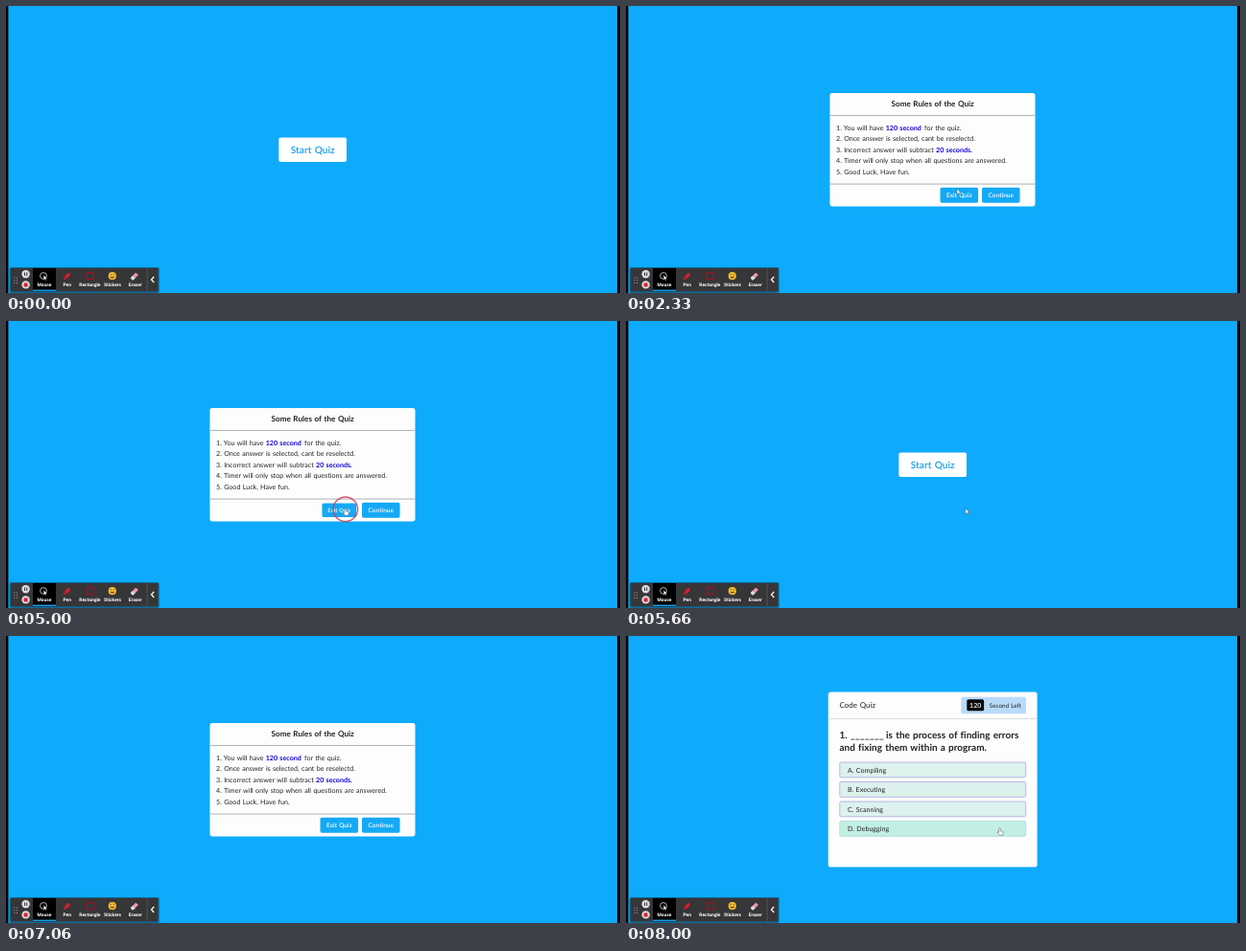
Write an HTML page that moves like this. It is 640x300 px and loops after 8.46 s.

```html
<!DOCTYPE html>
<html lang="en">
<head>
<meta charset="utf-8">
<title>Code Quiz</title>
<style>
  html, body { margin: 0; width: 100%; height: 100%; overflow: hidden; background: #0eaafb; }
  svg { display: block; width: 640px; height: 300px; }
  text { font-family: Lato, "Open Sans", sans-serif; fill: #222; text-rendering: geometricPrecision;
         letter-spacing: .003em; word-spacing: .067em; white-space: pre; }
  .mid { text-anchor: middle; }
  .bold { font-weight: 700; }
  .semi { font-weight: 600; }
  .row { font-size: 7.1px; }
  .blue { font-weight: 700; fill: #1200dc; }
  .btn { font-size: 6.5px; fill: #fff; }
  .ask { font-size: 10px; font-weight: 700; }
  .tool text { font: 700 4.9px Roboto, Arial, sans-serif; fill: #fff; letter-spacing: 0; }
  .zoom { transform-box: fill-box; transform-origin: center; }
</style>
</head>
<body>
<svg viewBox="0 0 640 300">
  <rect width="640" height="300" fill="#0eaafb"/>
  <rect width="2.4" height="300"/>
  <rect x="637" width="3" height="300"/>

  <g id="start" class="zoom">
    <rect x="284.3" y="137.5" width="70.7" height="25.5" rx="2" fill="#fdfefe"/>
    <text class="mid semi" x="319.7" y="153.5" font-size="10.1" style="fill:#159fe8">Start Quiz</text>
  </g>

  <g id="info" class="zoom">
    <rect x="212.5" y="91" width="214" height="118.5" rx="2.4" fill="#fdfdfd"/>
    <path d="M212.5 114.4h214M212.5 186.1h214" stroke="#a5a8ab" stroke-width=".9"/>
    <text class="mid bold" x="319.7" y="105" font-size="8.1">Some Rules of the Quiz</text>
    <g id="rules"></g>
    <g id="exit" class="zoom">
      <rect x="327.5" y="189.7" width="39.6" height="16.1" rx="1.8" fill="#14a9f5"/>
      <text class="btn mid semi" x="347.3" y="199.9">Exit Quiz</text>
    </g>
    <g id="next" class="zoom">
      <rect x="371" y="189.7" width="39.6" height="16.1" rx="1.8" fill="#14a9f5"/>
      <text class="btn mid semi" x="390.8" y="199.9">Continue</text>
    </g>
  </g>

  <g id="quiz" class="zoom">
    <rect x="210.8" y="58.5" width="217.8" height="183" rx="2.6" fill="#fdfdfd"/>
    <path d="M210.8 86.5h217.8" stroke="#d3d6d8" stroke-width=".8"/>
    <text x="222.5" y="75.4" font-size="8">Code Quiz</text>
    <rect x="349.3" y="63.8" width="67.7" height="17.4" rx="1.6" fill="#b8dbfa"/>
    <rect x="355.3" y="66.3" width="17.8" height="12" rx="1.6" fill="#080808"/>
    <text class="mid semi" x="364.2" y="74.9" font-size="7" style="fill:#fff">120</text>
    <text x="378.8" y="74.7" font-size="6.3">Second Left</text>
    <text class="ask" x="222.5" y="106.7">1.</text>
    <text class="ask" x="234" y="106.7" style="letter-spacing:.035em">_______</text>
    <text class="ask" x="271" y="106.7">is the process of finding errors</text>
    <text class="ask" x="222.5" y="120.3">and fixing them within a program.</text>
    <g id="options"></g>
  </g>

  <g class="tool">
    <rect x="3.6" y="273" width="156.2" height="27" rx="2" fill="#0d4560" opacity=".6"/>
    <rect x="4.8" y="274" width="153.8" height="24.4" rx="1" fill="#363638"/>
    <rect x="28" y="274" width="24" height="24.4" fill="#000"/>
    <rect x="28" y="296.6" width="24" height="1.6" fill="#1b9be8"/>
    <path d="M147.2 274v24.4" stroke="#666" stroke-width=".6"/>
    <path d="M8.9 283.6v7M11.5 283.6v7" stroke="#aaa" stroke-dasharray="1 1.7"/>
    <circle cx="20.6" cy="280.2" r="4.2" fill="#dcdce2"/>
    <path d="M19.5 278.4v3.6M21.7 278.4v3.6" stroke="#444" stroke-width="1.1"/>
    <circle cx="20.6" cy="291.4" r="4.2" fill="#dcdce2"/>
    <rect x="18.6" y="289.4" width="4" height="4" rx=".4" fill="#d8232f"/>
    <circle cx="39" cy="282" r="3.4" fill="none" stroke="#ddd" stroke-width=".8"/>
    <path d="M39.2 281.2v5.4l1.3-1.1.8 1.6.9-.5-.8-1.5h1.7z" fill="#fff" stroke="#000" stroke-width=".4"/>
    <path d="M60 286l.8-3 4.2-4.2 2.2 2.2-4.2 4.2z" fill="#d81f33"/>
    <path d="M60.8 283l2.2 2.2" stroke="#7d0d1b" stroke-width=".7"/>
    <rect x="84.4" y="278.7" width="7.2" height="6.8" fill="none" stroke="#b00d20" stroke-width="1.1"/>
    <circle cx="110.8" cy="282.2" r="4.1" fill="#f0bb35"/>
    <path d="M108.4 283q2.4 3 4.8 0z" fill="#74401b"/>
    <path d="M109.3 280.2v1.2M112.3 280.2v1.2" stroke="#74401b" stroke-width=".9"/>
    <path d="M130 284l5.2-5.2 2.8 2.2-5.2 5.2h-1.6z" fill="#ee9aa9"/>
    <path d="M130 284l1.8-1.8 2.8 2.2-1.8 1.8h-1.6z" fill="#d9dfea"/>
    <path d="M154.3 283l-2.8 3 2.8 3" fill="none" stroke="#fff" stroke-width="1.2"/>
    <g id="labels"></g>
  </g>

  <circle id="ring" r="12.8" fill="none" stroke="#cf3a55" stroke-width="1.4" opacity=".85"/>
  <g id="cursor" fill="#fff" stroke="#4a4f55" stroke-width=".5" stroke-linejoin="round">
    <path id="arrow" d="M0 0V6l1.4-1.2.9 2 .9-.4-.9-1.9h1.9z"/>
    <path id="hand" d="M-.8.8a.8.8 0 0 1 1.6 0V3l2 .5q.8.3.7 1.2L3 7.4H-.4l-2-2.6q-.3-1 .6-.8l1 .7z"/>
  </g>
</svg>
<script>
  const $ = id => document.getElementById(id);
  const LOOP = 8460, FPS = 15;

  // A starred part of a rule is bold blue and starts at the given x.
  const rules = ['1. You will have', '2. Once answer is selected, cant be reselectd.',
    '3. Incorrect answer will subtract', '4. Timer will only stop when all questions are answered.',
    '5. Good Luck, Have fun.'];
  const ruleText = (x, row, s, tone = '') =>
    `<text class="row ${tone}" x="${x}" y="${129.7 + row * 11.52}">${s}</text>`;
  $('rules').innerHTML = rules.map((s, i) => ruleText(219, i, s)).join('') +
    ruleText(270.7, 0, '120 second', 'blue') + ruleText(311, 0, 'for the quiz.') +
    ruleText(323, 2, '20 seconds.', 'blue');

  $('options').innerHTML = ['A. Compiling', 'B. Executing', 'C. Scanning', 'D. Debugging'].map((s, i) => {
    const y = 132 + i * 20.5, [fill, edge] = i === 3 ? ['#c2efe4', '#a9d8d3'] : ['#ddf1ed', '#a9a9dc'];
    return `<rect x="222.8" y="${y}" width="193.9" height="15.8" rx="1.4" fill="${fill}" stroke="${edge}" stroke-width=".8"/>
      <text class="row" x="231" y="${y + 10.5}">${s}</text>`;
  }).join('');

  $('labels').innerHTML = ['Mouse', 'Pen', 'Rectangle', 'Stickers', 'Eraser'].map((s, i) =>
    `<text class="mid" x="${40 + i * 23.7}" y="293">${s}</text>`).join('');

  // Pointer moves, in ticks of 1/15 s; each starts where the last one ended.
  const home = { x: 302, y: 192 };
  const moves = [
    { from: 1, to: 6, x: 335, y: 155 },
    { from: 11, to: 14, x: 338, y: 155 },
    { from: 32, to: 38, x: 346, y: 196 },
    { from: 47, to: 57, x: 376.8, y: 195 },
    { from: 63, to: 69, x: 353.8, y: 195.8 },
    { from: 85, to: 90, x: 338, y: 154.8 },
    { from: 103, to: 111, x: 389.5, y: 200.8 }
  ];
  const clicks = [23, 75, 97, 117];

  // Where each button is shown and which screen it opens.
  const buttons = {
    start: { on: 'start', opens: 'info' },
    exit: { on: 'info', opens: 'start' },
    next: { on: 'info', opens: 'quiz' }
  };
  for (const id in buttons) buttons[id].box = $(id).querySelector('rect').getBBox();

  const clamp = v => Math.min(1, Math.max(0, v));
  const easeOut = (u, power) => 1 - (1 - u) ** power;
  const show = (id, on) => { $(id).style.display = on ? '' : 'none'; };

  function pointer(k) {
    return moves.reduce((p, m) => {
      const f = easeOut(clamp((k - m.from) / (m.to - m.from)), 3);
      return { x: p.x + (m.x - p.x) * f, y: p.y + (m.y - p.y) * f };
    }, home);
  }

  function buttonAt(p, screen) {
    return Object.keys(buttons).find(id => {
      const { on, box } = buttons[id];
      return on === screen && p.x >= box.x && p.x <= box.x + box.width &&
        p.y >= box.y && p.y <= box.y + box.height;
    });
  }

  // Replays the session up to tick k; levels approach 0 or 1 at a steady rate.
  function stateAt(k) {
    const level = { start: 0, exit: 0, next: 0, info: 0, quiz: 0 };
    let screen = 'start', over;
    for (let i = 0; i <= k; i++) {
      for (const id in level) level[id] = clamp(level[id] + (id === over || id === screen && id !== 'start' ? 0.4 : -0.4));
      over = buttonAt(pointer(i), screen);
      if (clicks.includes(i) && over) {
        screen = buttons[over].opens;
        over = undefined;
      }
    }
    return { level, screen, over };
  }

  function draw(ms) {
    const k = Math.floor((Math.floor(ms / 10) * 10 + 9.5) * FPS / 1000);
    const { level, screen, over } = stateAt(k);
    for (const id in level) {
      const v = easeOut(level[id], 2), el = $(id);
      if (!buttons[id]) el.style.opacity = v;
      el.style.transform = `scale(${buttons[id] ? 1 - 0.1 * v : 0.9 + 0.1 * v})`;
    }
    const p = pointer(k);
    const clicked = clicks.some(c => k === c || k === c + 1);
    const hand = clicked || screen === 'quiz' || over && level[over] > 0;
    $('cursor').setAttribute('transform', `translate(${p.x} ${p.y})`);
    $('ring').setAttribute('transform', `translate(${p.x} ${p.y + 1})`);
    // Over the dialog's text the pointer is a caret too thin to see.
    show('cursor', k > 0 && (screen !== 'info' || over || clicked));
    show('hand', hand);
    show('arrow', !hand);
    show('ring', clicked);
  }

  const begin = performance.now();
  function tick() {
    draw((performance.now() - begin) % LOOP);
    requestAnimationFrame(tick);
  }
  tick();
</script>
</body>
</html>
```
